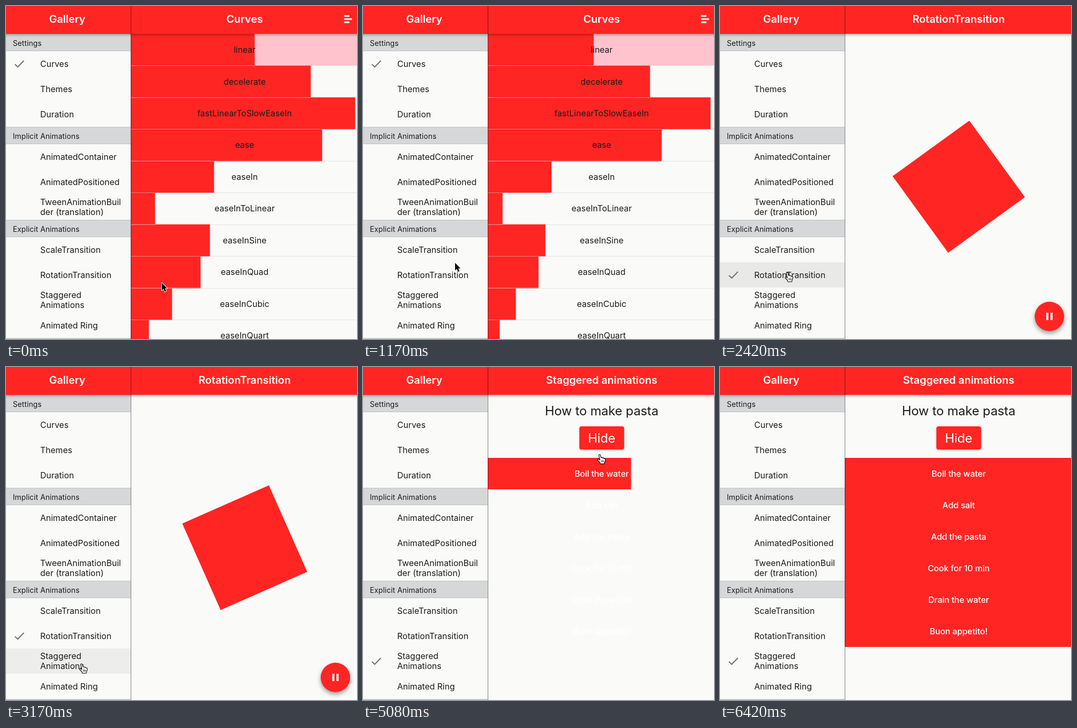
An HTML page with a canvas that plays this animation: 667 px wide and 634 px high, repeating every 6.51 s.

```html
<!DOCTYPE html>
<html lang="en">
<head>
<meta charset="utf-8">
<title>Animations gallery</title>
<style>
  html, body { margin: 0; width: 100%; height: 100%; overflow: hidden; background: #fafaf8; }
  canvas { display: block; width: 667px; height: 634px; }
</style>
</head>
<body>
<canvas id="stage" width="667" height="634"></canvas>
<script>
const ctx = document.getElementById('stage').getContext('2d');
const W = 667, H = 634, SIDE = 237, MID = 453.5;
const RED = '#ff2523', PAPER = '#fafaf8', INK = '#1b1b1b';
const LOOP = 6510, STEP = 250 / 3;

// Timeline in ms; every page runs one controller that swings 0 -> 1 -> 0
const CURVE_ZERO = 629, CURVE_TIME = 1148;
const ROTATE_AT = 2010, TURN_ZERO = 1966, TURN_TIME = 1126;
const STAGGER_AT = 3600, SHOW_AT = 4963, ROW_TIME = 190;

function bezier(x1, y1, x2, y2) {
  const at = (a, b, s) => 3 * a * s * (1 - s) ** 2 + 3 * b * s * s * (1 - s) + s ** 3;
  return x => {
    let lo = 0, hi = 1;
    for (let i = 0; i < 24; i++) {
      const m = (lo + hi) / 2;
      if (at(x1, x2, m) < x) lo = m; else hi = m;
    }
    return at(y1, y2, lo);
  };
}

const curves = [
  ['linear', t => t],
  ['decelerate', t => 1 - (1 - t) ** 2],
  ['fastLinearToSlowEaseIn', bezier(0.18, 1, 0.04, 1)],
  ['ease', bezier(0.25, 0.1, 0.25, 1)],
  ['easeIn', bezier(0.42, 0, 1, 1)],
  ['easeInToLinear', bezier(0.67, 0.03, 0.65, 0.09)],
  ['easeInSine', bezier(0.47, 0, 0.745, 0.715)],
  ['easeInQuad', bezier(0.55, 0.085, 0.68, 0.53)],
  ['easeInCubic', bezier(0.55, 0.055, 0.675, 0.19)],
  ['easeInQuart', bezier(0.895, 0.03, 0.685, 0.22)]
];

const sections = [
  [53, 'Settings', ['Curves', 'Themes', 'Duration']],
  [230, 'Implicit Animations',
    ['AnimatedContainer', 'AnimatedPositioned', 'TweenAnimationBuil|der (translation)']],
  [407, 'Explicit Animations',
    ['ScaleTransition', 'RotationTransition', 'Staggered|Animations', 'Animated Ring']]
];

const steps = ['Boil the water', 'Add salt', 'Add the pasta',
  'Cook for 10 min', 'Drain the water', 'Buon appetito!'];

// Pointer path: time, x, y
const path = [
  [0, 296, 527], [250, 296, 527], [1167, 175, 489], [1450, 129, 507], [2500, 129, 507],
  [2950, 145, 565], [3750, 145, 565], [4333, 545, 77], [4720, 452, 132],
  [5020, 452, 132], [5400, 440, 596], [5540, 440, 660]
];

const clamp = v => Math.max(0, Math.min(1, v));

function swing(t, period) {
  const p = Math.abs(t / period) % 2;
  return p > 1 ? 2 - p : p;
}

function rect(x, y, w, h, color) {
  ctx.fillStyle = color;
  ctx.fillRect(x, y, w, h);
}

function text(str, x, y, size, { color = INK, weight = 400, align = 'left', track = 0 } = {}) {
  ctx.font = `${weight} ${size}px Inter, "Open Sans", sans-serif`;
  ctx.letterSpacing = `${track * size}px`;
  ctx.textAlign = align;
  ctx.fillStyle = color;
  ctx.fillText(str, x, y + size * 0.364);
}

function shadow(alpha, blur, dy) {
  ctx.shadowColor = `rgba(0,0,0,${alpha})`;
  ctx.shadowBlur = blur;
  ctx.shadowOffsetY = dy;
}

function poly(points, close) {
  ctx.beginPath();
  points.forEach(([x, y]) => ctx.lineTo(x, y));
  if (close) ctx.closePath();
}

function drawSidebar(selected, hovered) {
  rect(0, 53, SIDE, H - 53, PAPER);
  for (const [top, title, items] of sections) {
    rect(0, top, SIDE, 33, '#d6d7d8');
    rect(0, top, SIDE, 1, '#c2c3c4');
    rect(0, top + 32, SIDE, 1, '#bfc0c1');
    text(title, 13, top + 17.5, 14, { track: 0.007 });
    items.forEach((item, i) => {
      const y = top + 33 + i * 48, mid = y + 24;
      if (item === hovered) rect(0, y, SIDE, 48, item === selected ? '#e9e9e7' : '#edeeec');
      const lines = item.split('|');
      lines.forEach((line, j) => text(line, 65, mid + (lines.length > 1 ? j * 19 - 9.5 : 0), 16));
      if (item === selected) {
        poly([[17, mid + 1], [22.3, mid + 6], [34, mid - 6]]);
        ctx.strokeStyle = '#757575';
        ctx.lineWidth = 2.3;
        ctx.stroke();
      }
    });
  }
  rect(0, 632, SIDE, 2, '#c8c9ca');
}

function drawCurves(t) {
  const p = swing(t - CURVE_ZERO, CURVE_TIME);
  rect(SIDE, 53, W - SIDE, 60, '#ffc3cd');
  curves.forEach(([name, ease], i) => {
    const y = 53 + i * 60.45, w = (W - SIDE) * ease(p), line = Math.round(y + 60.45);
    rect(SIDE, y, w, 60.45, RED);
    rect(SIDE, line, W, 1, '#e2e2e0');
    text(name, MID, y + 30.3, 16, { align: 'center' });
  });
  curves.forEach(([, ease], i) => {
    rect(SIDE, Math.round(53 + (i + 1) * 60.45), (W - SIDE) * ease(p), 1, '#e08480');
  });
}

function drawRotation(t) {
  ctx.save();
  ctx.translate(453.7, 344);
  ctx.rotate(swing(t - TURN_ZERO, TURN_TIME) * Math.PI * 2);
  rect(-90, -90, 180, 180, RED);
  ctx.restore();

  ctx.save();
  shadow(0.4, 9, 4);
  ctx.fillStyle = RED;
  ctx.beginPath();
  ctx.arc(626, 591, 28, 0, Math.PI * 2);
  ctx.fill();
  ctx.restore();
  rect(620, 584, 4, 14, '#fff');
  rect(628, 584, 4, 14, '#fff');
}

function drawStaggered(t) {
  const shown = t >= SHOW_AT, w = shown ? 85 : 95;
  text('How to make pasta', MID, 83.5, 24, { align: 'center', track: -0.004 });
  ctx.save();
  shadow(0.3, 3, 1.5);
  ctx.fillStyle = RED;
  ctx.beginPath();
  ctx.roundRect(MID + 0.2 - w / 2, 113, w, 44, 4);
  ctx.fill();
  ctx.restore();
  text(shown ? 'Hide' : 'Show', MID, 135.5, 24, { align: 'center', color: '#fff', track: -0.004 });
  steps.forEach((label, i) => {
    const y = 173 + i * 60;
    rect(SIDE, y, (W - SIDE) * clamp((t - SHOW_AT) / ROW_TIME - i), 60, RED);
    text(label, MID, y + 30, 16, { align: 'center', color: '#fff', weight: 500, track: -0.006 });
  });
}

function drawHeader(title, withIcon) {
  ctx.save();
  shadow(0.32, 5, 2);
  rect(-10, 0, W + 20, 53, RED);
  ctx.restore();
  const style = { align: 'center', color: '#fff', weight: 600 };
  text('Gallery', 116.5, 25, 20, style);
  text(title, MID, 25, 20, style);
  if (withIcon) [10, 15, 10].forEach((w, i) => rect(642.5, 17.5 + i * 6, w, 3, '#fff'));
  rect(SIDE, 0, 1, H, 'rgba(0,0,0,0.5)');
}

function pointerAt(t) {
  const i = path.findIndex(p => p[0] > t);
  if (i < 0) return null;
  const [t0, x0, y0] = path[i - 1], [t1, x1, y1] = path[i];
  const s = (t - t0) / (t1 - t0), e = s * s * (3 - 2 * s);
  return [x0 + (x1 - x0) * e, y0 + (y1 - y0) * e];
}

function drawPointer(t, hand) {
  const pos = pointerAt(t);
  if (!pos) return;
  ctx.save();
  ctx.translate(...pos);
  ctx.lineJoin = 'round';
  if (hand) {
    poly([[-3, 1], [-1.5, 0], [0, 1], [1, 6], [3, 5.5], [4, 7], [6, 6.5], [7, 8], [9, 8],
      [9.5, 11], [8, 15], [7.5, 18], [0, 18], [-1, 15], [-5, 11], [-5, 9], [-3, 9], [-1, 11]], true);
    ctx.fillStyle = '#fff';
    ctx.strokeStyle = '#000';
    ctx.lineWidth = 1.1;
    ctx.fill();
    ctx.stroke();
    for (let x = 1.5; x < 7; x += 2) rect(x, 11, 0.8, 4, '#000');
  } else {
    poly([[0, 0], [0, 14.5], [3.3, 11.4], [5.8, 17], [8.3, 15.9], [5.9, 10.4], [10.3, 10.4]], true);
    ctx.strokeStyle = '#fff';
    ctx.lineWidth = 2;
    ctx.stroke();
    ctx.fillStyle = '#000';
    ctx.fill();
  }
  ctx.restore();
}

function draw(t) {
  const within = (a, b) => t >= a && t < b;
  let selected = 'Curves', title = 'Curves', page = drawCurves;
  if (t >= STAGGER_AT) {
    [selected, title, page] = ['Staggered|Animations', 'Staggered animations', drawStaggered];
  } else if (t >= ROTATE_AT) {
    selected = title = 'RotationTransition';
    page = drawRotation;
  }
  const hovered = within(1400, 2740) ? 'RotationTransition'
    : within(2740, 3900) ? 'Staggered|Animations' : '';

  rect(0, 0, W, H, PAPER);
  page(t);
  drawSidebar(selected, hovered);
  drawHeader(title, page === drawCurves);
  drawPointer(t, hovered || within(4640, 5100));
}

const start = performance.now();
function tick() {
  const t = (performance.now() - start) % LOOP;
  draw(Math.min(77, Math.floor((t + 3.4) / STEP)) * STEP);
  requestAnimationFrame(tick);
}
tick();
</script>
</body>
</html>
```
